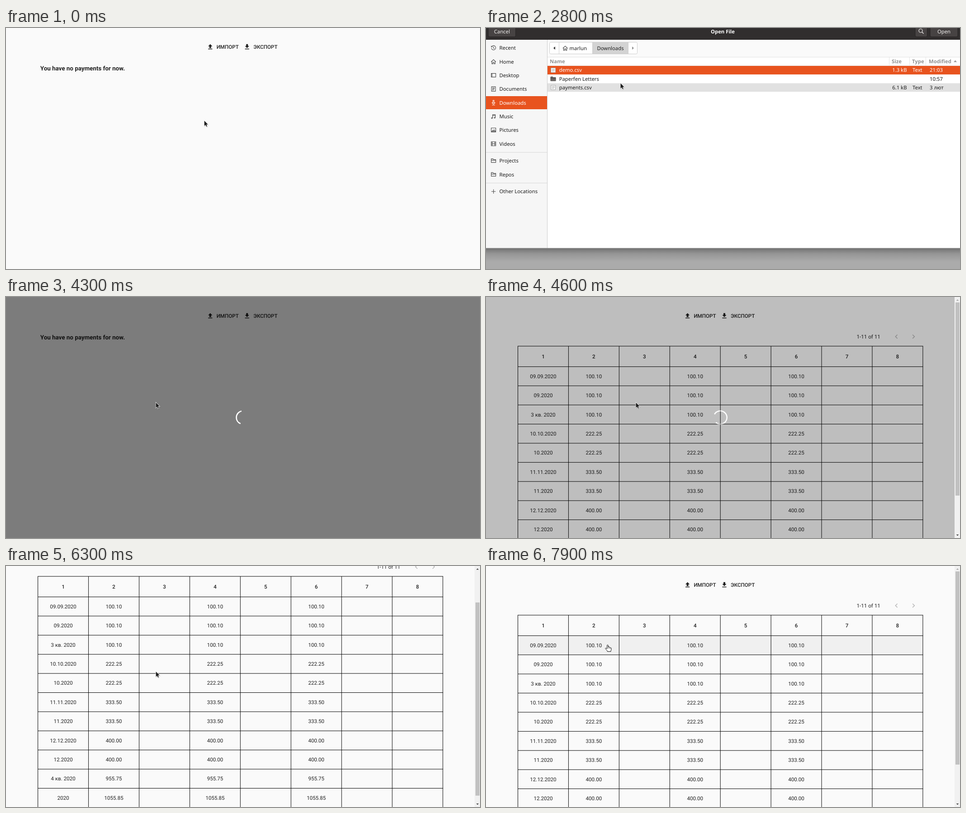
These frames come from a looping animation (1048x534 px, 8 s). An HTML page:

```html
<!DOCTYPE html>
<html lang="en">
<head>
<meta charset="utf-8">
<title>Payments import</title>
<style>
html, body { margin: 0; width: 100%; height: 100%; overflow: hidden; background: #fafafa; }
svg { display: block; }
text { white-space: pre; text-rendering: geometricPrecision; }
.page { font: 400 11.6px Roboto, sans-serif; fill: #212121; }
.head, .btn { font-weight: 500; }
.title { font-size: 13.36px; font-weight: 700; }
.dlg { font: 400 11.3px "Noto Sans", sans-serif; fill: #1c1c1c; }
.bold { font-weight: 700; }
.mid { text-anchor: middle; }
.end { text-anchor: end; }
.ico { fill: none; stroke: #4a4a4a; stroke-width: 1.1; }
</style>
</head>
<body>
<svg id="stage" width="1048" height="534" viewBox="0 0 1048 534"></svg>
<script>
const LOOP = 8000, MAX_SCROLL = 102.8, TOP = 154.4, ROW = 42.4, COL = 111.92;
const clamp = p => Math.max(0, Math.min(1, p));
const ramp = (t, a, b) => clamp((t - a) / (b - a));
const smooth = p => p * p * (3 - 2 * p);
const quad = p => p < .5 ? 2 * p * p : 1 - 2 * (1 - p) * (1 - p);

const rect = (x, y, w, h, fill, more = '') =>
  `<rect x="${x}" y="${y}" width="${w}" height="${h}" fill="${fill}" ${more}/>`;
const text = (x, y, s, cls = '', more = '') => `<text x="${x}" y="${y}" class="${cls}" ${more}>${s}</text>`;
const path = (d, more = '') => `<path d="${d}" ${more}/>`;
const at = (x, y, s, more = '') => `<g transform="translate(${x} ${y})" ${more}>${s}</g>`;

// Page toolbar and pager
const UP = 'M9 16h6v-6h4l-7-7-7 7h4zM5 18h14v2H5z';
const DOWN = 'M19 9h-4V3H9v6H5l7 7 7-7zM5 18v2h14v-2H5z';
const LEFT = 'M15.41 7.41 14 6l-6 6 6 6 1.41-1.41L10.83 12z';
const RIGHT = 'M10 6 8.59 7.41 13.17 12l-4.58 4.59L10 18l6-6z';
const icon = (x, y, size, d, fill) =>
  path(d, `transform="translate(${x} ${y}) scale(${size / 24})" fill="${fill}"`);

const toolbar =
  rect(440.8, 27, 80.8, 29, '#000', 'id="hover" rx="3.2" opacity="0"') +
  icon(443.6, 33.8, 16, UP, '#212121') + text(465.4, 45.7, 'ИМПОРТ', 'btn') +
  icon(525, 33.8, 16, DOWN, '#212121') + text(547, 45.7, 'ЭКСПОРТ', 'btn');
const pager = text(819.6, 92, '1-11 of 11') +
  icon(897.8, 78.1, 19.2, LEFT, '#b9b9b9') + icon(935.7, 78.1, 19.2, RIGHT, '#b9b9b9');

const rows = [
  ['09.09.2020', '100.10'], ['09.2020', '100.10'], ['3 кв. 2020', '100.10'],
  ['10.10.2020', '222.25'], ['10.2020', '222.25'],
  ['11.11.2020', '333.50'], ['11.2020', '333.50'],
  ['12.12.2020', '400.00'], ['12.2020', '400.00'],
  ['4 кв. 2020', '955.75'], ['2020', '1055.85']
];

// The table in page coordinates; scrolling moves the whole group
function table(hot) {
  const line = i => TOP + ROW * i, edge = c => 70.5 + COL * c;
  const bottom = line(rows.length);
  let s = hot < 0 ? '' : rect(edge(0), line(hot), COL * 8, ROW, '#f0f0f0');
  let d = `M70 108.9H${edge(8) + .5}`;
  for (let i = 0; i <= rows.length; i++) d += `M70 ${line(i)}H${edge(8) + .5}`;
  for (let c = 0; c <= 8; c++) d += `M${edge(c)} 108.9V${bottom}`;
  s += path(d, 'stroke="#000" fill="none"');
  for (let c = 0; c < 8; c++) s += text(edge(c + .5), 135.7, c + 1, 'mid head');
  rows.forEach(([date, sum], i) => {
    const y = line(i + .5) + 4.1;
    s += text(edge(.5), y, date, 'mid');
    for (const c of [1, 3, 5]) s += text(edge(c + .5), y, sum, 'mid');
  });
  return s;
}

const scrollbar = rect(1036, 0, 12, 534, '#f1f1f1') +
  rect(1038, 12, 9, 428, '#c1c1c1', 'id="thumb"') +
  path('M1039.7 8.2h5.6l-2.8-3z', 'id="barUp"') +
  path('M1039.7 526.3h5.6l-2.8 3z', 'id="barDown"');

// File dialog
const folder = 'M.6 9.4v-8h4l1 1.6h5v6.4zM.6 4.6h10';
const places = [
  [44, 'Recent', 'M2 2.4A4.8 4.8 0 1 1 1 6M.8 1v2.4h2.4M5.6 3v3l2 1.2'],
  [74.5, 'Home', 'M.4 6 5.6 1l5.2 5M2 5v5.4h2.4V7h2.4v3.4h2.4V5'],
  [104.5, 'Desktop', 'M.6 1.6h10v8H.6zM2.3 2v7.4'],
  [135, 'Documents', 'M1.2.6h8.8v10H1.2zM3 3.2h5M3 5.4h5M3 7.6h3'],
  [165.5, 'Downloads', 'M4.4.4v5.4H2.4l3.2 3 3.2-3H6.8V.4zM2.4 10.8h6.4'],
  [196, 'Music', 'M3.6 9V1.6h6v6.6M3.6 3.2h6M3.4 9a1.2 1.2 0 1 1-2.4 0 1.2 1.2 0 1 1 2.4 0M9.4 8.2a1.2 1.2 0 1 1-2.4 0 1.2 1.2 0 1 1 2.4 0'],
  [226, 'Pictures', 'M.6 1h10v9H.6zM2 8.6l2.4-3 1.6 1.6L7.6 5l2 3.6z'],
  [256.5, 'Videos', 'M.6 1h10v9H.6zM3 1v9M8.2 1v9M3 5.5h5.2M.6 4H3M.6 7H3M8.2 4h2.4M8.2 7h2.4'],
  [294, 'Projects', folder],
  [324.5, 'Repos', folder],
  [362, 'Other Locations', 'M5.6 1v9.4M.9 5.7h9.4']
];
const white = 'style="fill:#fff"', pale = 'style="fill:#f2f0ef"', grey = 'style="fill:#929292"';

function sidebar() {
  let s = rect(0, 26, 135, 462, '#f6f6f6') + rect(0, 151, 135, 29, '#e8531e');
  for (const [y, name, d] of places) {
    const on = name === 'Downloads';
    s += at(11, y - 5.5, path(d, `class="ico" ${on ? 'style="stroke:#fff"' : ''}`)) +
      text(29.5, y + 4, name, '', on ? white : '');
  }
  return s + rect(0, 275, 135, 1, '#d8d8d8') + rect(0, 343, 135, 1, '#d8d8d8') +
    rect(135, 26, 1, 462, '#cdcdcd');
}

const headBtn = (x, w, label) => rect(x, -10, w, 29.5, '#474343', 'rx="3" stroke="#272424"') +
  text(x + w / 2, 11.5, label, 'mid', pale);

const crumbs = rect(136, 26, 912, 38, '#fafafa') +
  rect(140.5, 31.5, 194, 26, '#fff', 'rx="3" stroke="#cdcdcd"') +
  rect(236, 32, 78, 25, '#d3d3d3') +
  path('M161.5 32v25M235.5 32v25M314.5 32v25', 'stroke="#cdcdcd"') +
  path('M153 41v7l-4-3.5z', 'fill="#333"') + path('M323 41v7l4-3.5z', 'fill="#929292"') +
  at(169.5, 39, path(places[1][2], 'class="ico"')) +
  text(184.5, 48.5, 'marlun') + text(275, 48.5, 'Downloads', 'mid');

const columns = rect(136, 64, 912, 424, '#fff') + rect(136, 64, 912, 1, '#e2e2e2') +
  text(141, 77.5, 'Name', 'bold', grey) + text(897, 77.5, 'Size', 'bold', grey) +
  text(942, 77.5, 'Type', 'bold', grey) + text(979, 77.5, 'Modified', 'bold', grey) +
  path('M1034 75.5h7l-3.5-4z', 'fill="#929292"') +
  path('M891.5 65v18M936.5 65v18M972.5 65v18M136 83.5h912', 'stroke="#e4e4e4"');

const sheet = path('M.5.5h10v10H.5z', 'fill="#fbfbfb" stroke="#aaa"') +
  path('M2.6 3.3h6M2.6 5.5h6M2.6 7.7h4', 'stroke="#aaa" fill="none"');
const dir = path('M0 2q0-1.6 1.5-1.6h3.5l1.4 1.5H11q1.4 0 1.4 1.4v6q0 1.3-1.4 1.3H1.4Q0 10.6 0 9.2z', 'fill="#6a6563"') +
  path('M.5 3.8h11.4', 'stroke="#45403f"');
const files = [
  ['demo.csv', '1.3 kB', 'Text', '21:03'],
  ['Paperfen Letters', '', '', '10:57'],
  ['payments.csv', '6.1 kB', 'Text', '3 лют']
];
const fileRows = files.map(([name, size, type, when], i) => {
  const y = 84 + 19.2 * i, b = y + 13.4, more = i ? '' : white;
  return rect(136, y, 912, 18.9, i ? '#e1e1e1' : '#e8531e', `id="file${i}"`) +
    at(i === 1 ? 142.3 : 143.2, y + 4, i === 1 ? dir : sheet) +
    text(161.7, b, name, '', more) + text(930.5, b, size, 'end', more) +
    text(943, b, type, '', more) + text(981, b, when, '', more);
}).join('');

const dialog = rect(0, 488, 1048, 30, 'url(#shade)') +
  rect(0, -40, 1048, 66, '#312e2e') + rect(0, 25, 1048, 1, '#232020') +
  headBtn(5, 60.5, 'Cancel') + headBtn(949, 26.5, '') + headBtn(982, 61, 'Open') +
  '<circle cx="961" cy="6" r="4" fill="none" stroke="#f2f0ef" stroke-width="1.2"/>' +
  path('M964 9l3.5 3.5', 'stroke="#f2f0ef" stroke-width="1.4"') +
  text(523.5, 11.5, 'Open File', 'mid bold', white) +
  crumbs + columns + fileRows + sidebar() + rect(0, 487.5, 1048, 1, '#8a8a8a');

// Pointers, drawn with the hot spot at 0,0
const ARROW = 'M0 0V12.8L2.9 10 4.9 14.5 6.9 13.6 5 9.2H8.9z';
const HAND = 'M-1.4 1Q-1.4-.2-.2-.2T1.1 1V5Q2 0 3.4 5.3 4.7 4.3 5.7 6 7 5.1 7.9 6.8V10.2Q7.9 11.7 6.9 12.8V14.4H-.8V13Q-3 10.8-5 8.2-5.6 7.1-4.6 6.7-3.6 6.5-1.4 8.6z';
const pointers = `<g id="arrow" transform="translate(.5 1) scale(.9)">${
  path(ARROW, 'transform="translate(.8 1.2)" opacity=".16" stroke="#000" stroke-width="1.5"')}${
  path(ARROW, 'fill="#1c1c1c" stroke="#fff" stroke-width="1.5" paint-order="stroke"')}</g><g id="hand">${
  path(HAND, 'transform="translate(.6 1)" opacity=".18"')}${
  path(HAND, 'fill="#fff" stroke="#1a1a1a" stroke-linejoin="round"')}${
  path('M1.1 5.5V7.8M3.4 5.8V7.8M5.7 6.4V8.2', 'stroke="#1a1a1a" stroke-width=".8"')}</g>`;

document.getElementById('stage').innerHTML =
  `<defs><linearGradient id="shade" x2="0" y2="1"><stop stop-opacity=".34"/>
  <stop offset=".4" stop-opacity=".13"/><stop offset="1" stop-opacity="0"/></linearGradient></defs>` +
  rect(0, 0, 1048, 534, '#fafafa') +
  `<g class="page"><g id="top">${toolbar}</g>${text(75.8, 93.7, 'You have no payments for now.', 'title', 'id="empty"')}
  <g id="list">${pager}<g id="table"></g></g></g>` +
  `<g id="wait">${rect(0, 0, 1048, 534, '#000', 'opacity=".5"')}<g id="spin">
  <circle id="arc" r="20.2" fill="none" stroke="#fff" stroke-width="3.6"/></g></g>` +
  `<g id="bar">${scrollbar}</g>` +
  rect(0, 0, 1048, 534, '#000', 'id="dim"') +
  `<g id="dialog" class="dlg">${dialog}</g><g id="pointer">${pointers}</g>`;

const el = {};
document.querySelectorAll('[id]').forEach(n => el[n.id] = n);
const set = (id, name, v) => el[id].setAttribute(name, v);
const show = (id, on) => el[id].style.display = on ? '' : 'none';

const track = [
  [1400, 438, 204.5], [1780, 484.5, 43], [2450, 484.5, 43], [2700, 306, 138],
  [2800, 297, 121.5], [2980, 262, 94], [3750, 255, 94], [4200, 331, 233],
  [7180, 331, 233], [7600, 269, 175]
];
function pointerAt(t) {
  const i = track.findIndex(k => k[0] > t);
  if (i === 0) return track[0].slice(1);
  if (i < 0) return track[track.length - 1].slice(1);
  const [a, ax, ay] = track[i - 1], [b, bx, by] = track[i];
  const p = smooth(ramp(t, a, b));
  return [ax + (bx - ax) * p, ay + (by - ay) * p];
}

let drawn;
function render(t) {
  const loaded = t >= 4500;
  const scroll = MAX_SCROLL * (quad(ramp(t, 5950, 6442)) - quad(ramp(t, 6750, 7150)));
  const [x, y] = pointerAt(t);
  const onButton = t < 2350 && x > 441 && x < 522 && y > 27 && y < 56;
  const hot = t > 7180 ? Math.floor((y - TOP) / ROW) : -1;

  set('top', 'transform', `translate(${loaded ? -6 : 0} ${-scroll})`);
  set('hover', 'opacity', .04 * ramp(t, 1600, 1850) * (1 - ramp(t, 2300, 2550)));
  show('empty', !loaded);
  show('list', loaded);
  show('bar', loaded);
  if (loaded) {
    if (hot !== drawn) el.table.innerHTML = table(hot);
    drawn = hot;
    set('list', 'transform', `translate(0 ${-scroll})`);
    set('thumb', 'y', 12 + 82.3 * scroll / MAX_SCROLL);
    set('barUp', 'fill', scroll > .5 ? '#404040' : '#a3a3a3');
    set('barDown', 'fill', scroll < MAX_SCROLL - .5 ? '#404040' : '#a3a3a3');
  }

  // Backdrop and spinner
  const wait = smooth(ramp(t, 3950, 4175)) * (1 - smooth(ramp(t, 4500, 4695)));
  const turn = ((t - 3950) / 1400 % 1 + 1) % 1;
  const grow = smooth(clamp(turn * 2)), chase = smooth(clamp(turn * 2 - 1));
  show('wait', wait > 0);
  set('wait', 'opacity', wait);
  set('spin', 'transform', `translate(${loaded ? 518 : 524} 267) scale(${32 / 44}) rotate(${360 * turn})`);
  set('arc', 'stroke-dasharray', `${1 + 99 * grow} 200`);
  set('arc', 'stroke-dashoffset', -15 * grow - 110 * chase);

  // File dialog unfolds around its middle
  const open = smooth(ramp(t, 2330, 2450)) * (1 - smooth(ramp(t, 3800, 3900)));
  set('dim', 'opacity', .316 * smooth(ramp(t, 2300, 2550)) * (1 - smooth(ramp(t, 3800, 3950))));
  show('dialog', open > 0);
  set('dialog', 'transform', `translate(0 ${224 * (1 - open)}) scale(1 ${open})`);
  const late = pointerAt(t - 60)[1];
  const file = Math.floor((late - 84) / 19.2);
  show('file1', file === 1);
  show('file2', file === 2);

  const hand = onButton || hot >= 0;
  show('hand', hand);
  show('arrow', !hand);
  set('pointer', 'transform', `translate(${x} ${y})`);
}

const start = performance.now();
function tick() {
  render((performance.now() - start) % LOOP);
  requestAnimationFrame(tick);
}
tick();
</script>
</body>
</html>
```
